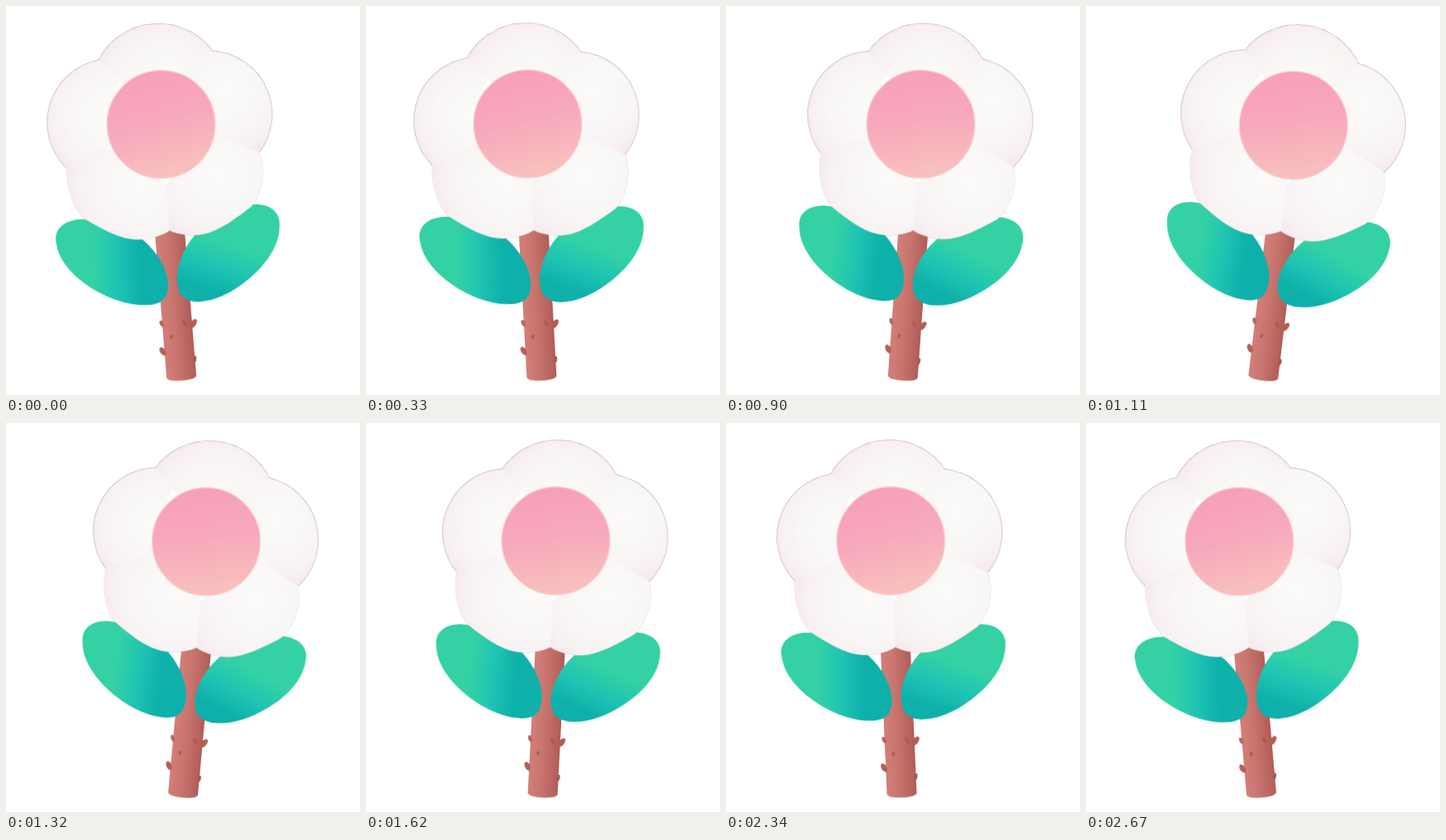
An HTML page that plays this animation: 428 px wide and 471 px high, repeating every 2700 ms.

```html
<!DOCTYPE html>
<html lang="en">
<head>
<meta charset="utf-8">
<title>Swaying flower</title>
<style>
  html, body { margin: 0; width: 100%; height: 100%; overflow: hidden; background: #fff; }
  svg { display: block; width: 428px; height: 471px; }
  #flower { transform-origin: 213px 460px; }
</style>
</head>
<body>
<svg viewBox="0 0 428 471">
  <defs>
    <linearGradient id="bark">
      <stop offset="0" stop-color="#d17f78"/>
      <stop offset=".45" stop-color="#c8746e"/>
      <stop offset="1" stop-color="#b05c57"/>
    </linearGradient>
    <linearGradient id="leafL" gradientUnits="userSpaceOnUse" x1="134" y1="0" x2="190" y2="3">
      <stop offset="0" stop-color="#33d1a3"/>
      <stop offset=".5" stop-color="#1fc5b3"/>
      <stop offset="1" stop-color="#0eb0aa"/>
    </linearGradient>
    <linearGradient id="leafR" gradientUnits="userSpaceOnUse" x1="287" y1="295" x2="264" y2="350">
      <stop offset="0" stop-color="#33d1a3"/>
      <stop offset=".5" stop-color="#1fc5b3"/>
      <stop offset="1" stop-color="#0eb0aa"/>
    </linearGradient>
    <linearGradient id="disc" x1=".4" y1="0" x2=".6" y2="1">
      <stop offset="0" stop-color="#f79fbb"/>
      <stop offset=".45" stop-color="#f7a8bb"/>
      <stop offset="1" stop-color="#f8c2bd"/>
    </linearGradient>
    <path id="leaf" d="M75 275C73 258 88 249 105 249C130 249 160 261 180 280C196 296 206 317 206 333C206 350 199 359 182 359C150 359 119 340 100 322C86 308 76 293 75 275Z"/>
  </defs>
  <g id="flower">
    <path d="M195 262H231V449Q229 453.5 213 453.5T195 449Z" fill="url(#bark)"/>
    <g id="thorns"></g>
    <use href="#leaf" fill="url(#leafL)"/>
    <path d="M346 275C348 257 333 248 317 248C291 249 262 262 242 280C227 295 217 317 217 334C217 351 226 360 243 360C273 360 302 341 321 323C335 309 345 293 346 275Z" fill="url(#leafR)"/>
    <g id="petals"></g>
    <circle cx="213" cy="142.3" r="65.5" fill="url(#disc)" stroke="#fad5db" stroke-width="1.2"/>
  </g>
</svg>
<script>
  const NS = 'http://www.w3.org/2000/svg';
  const $ = id => document.getElementById(id);

  function add(parent, tag, attrs) {
    const el = document.createElementNS(NS, tag);
    for (const k in attrs) el.setAttribute(k, attrs[k]);
    return parent.appendChild(el);
  }

  // Outer edge, inner seam, then the bright spot (x, y) and its reach
  const petals = [
    ['M144 59A81 81 0 0 1 282 59', 'L256 88L213 142L169 86Z', 222, 100, 98],
    ['M282 59A76.5 76.5 0 0 1 328 186', 'L288 165L281 146L213 142L256 88Z', 294, 108, 88],
    ['M328 186C333 201 333 228 314 250C294 263 272 277 252 279C236 280 221 276 213 271', 'V215L220 207L213 142L281 146L288 165Z', 278, 206, 98],
    ['M213 271C205 276 190 280 174 279C152 277 132 263 112 249C103 240 92 215 95.500 186', 'L140 165L155 172L213 142V215Z', 184, 210, 100],
    ['M95.500 186A76.500 76.500 0 0 1 144 59', 'L168 84L161 96L213 142L155 172L140 165Z', 150, 128, 88]
  ];

  const outline = petals.map(([edge]) => add($('petals'), 'path', {
    d: edge, fill: 'none', stroke: '#8d737c', 'stroke-opacity': .75, 'stroke-width': 1.3
  }));
  outline[2].setAttribute('stroke-opacity', .25);
  outline[3].setAttribute('stroke-opacity', .25);

  petals.forEach(([edge, seam, cx, cy, r], i) => {
    const grad = add(document.querySelector('defs'), 'radialGradient', {
      id: 'petal' + i, gradientUnits: 'userSpaceOnUse', cx, cy, r
    });
    [[0, '#fcfbf9'], [.5, '#f9f7f5'], [.75, '#f8f1f2'], [1, '#f5e6ec']].forEach(([offset, color]) =>
      add(grad, 'stop', { offset, 'stop-color': color }));
    const fill = `url(#petal${i})`;
    add($('petals'), 'path', { d: edge + seam, fill, stroke: fill, 'stroke-width': .4 });
  });

  // x, y, rx, ry, tilt, colour
  [
    [194.5, 383, 2.3, 4.2, -20, '#b9655f'],
    [222, 384.5, 2, 4, -25, '#ae5852'],
    [205, 400, 1.5, 3, 25, '#ac5751'],
    [193, 416.5, 3.2, 5.6, -28, '#b45f59'],
    [231, 429, 1.8, 4, 10, '#a9544f']
  ].forEach(([cx, cy, rx, ry, tilt, fill]) =>
    add($('thorns'), 'ellipse', { cx, cy, rx, ry, fill, transform: `rotate(${tilt} ${cx} ${cy})` }));
  add($('thorns'), 'path', { d: 'M229 384L234 380.500Q238 380 237 384Q235 390 231 391Z', fill: '#b25d57' });

  $('flower').animate([
    { offset: 0, transform: 'rotate(-4.6deg)', easing: 'cubic-bezier(.45, 0, .95, .95)' },
    { offset: .4, transform: 'rotate(7.07deg)', easing: 'linear' },
    { offset: 1, transform: 'rotate(-5.2deg)' }
  ], { duration: 2700, iterations: Infinity });
</script>
</body>
</html>
```
